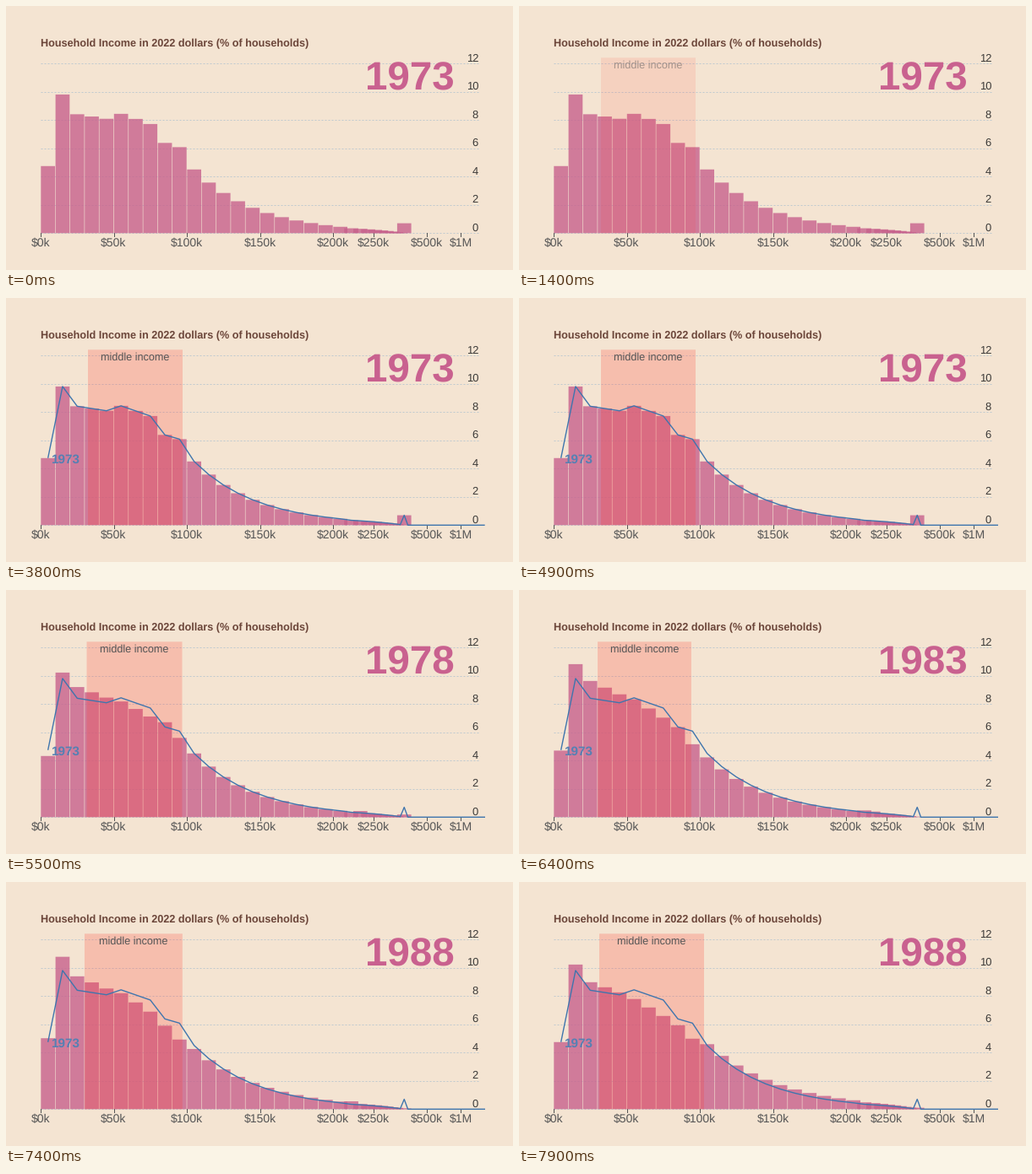
A matplotlib script that plays this animation: 600x313 px, repeating every 8 s.

```python
import numpy as np
import matplotlib.pyplot as plt
from matplotlib.animation import FuncAnimation
from matplotlib.patches import Rectangle

W, H, DPI = 600, 313, 100
FRAMES, STEP = 80, 100
BG = "#f4e4d2"
PINK = "#c7618c"
BLUE = "#3f75ad"
GREY = "#555555"
X0, BIN, Y0, UNIT = 41, 17.3, 269.3, 16.74
BINS, SQUEEZE = 32, 20      # bins from index 20 ($200k) on are squeezed

FADE = (900, 1000)          # start, duration in ms
TRACE = (1900, 2000)
LABEL = (2900, 1000)
YEARS_AT, YEARS_DUR = 4905, 1000

plt.rcParams["font.family"] = "Liberation Sans"
plt.rcParams["text.hinting"] = "none"


def ease(t):
    t = min(max(t, 0), 1)
    return 4 * t**3 if t < .5 else 1 - 4 * (1 - t)**3


def progress(ms, start, dur):
    return ease((ms - start) / dur)


def bin_x(i):
    squeezed = 65 * np.log(1 + .22 * np.maximum(i - SQUEEZE, 0))
    return X0 + BIN * np.minimum(i, SQUEEZE) + squeezed


KEY_BINS = [0, 1, 2, 4, 5, 7, 8, 9, 10]


def shares(keys, at_200k, top_bin, top):
    """Key points up to $100k, exponential decay to $200k, then linear to 0.
    The open-ended top bracket stands out of the tail."""
    i = np.arange(BINS)
    head = np.interp(i, KEY_BINS, keys)
    decay = keys[-1] * (at_200k / keys[-1]) ** ((i - 10) / 10)
    tail = .85 * at_200k * np.clip(1 - (i - SQUEEZE) / 10, 0, 1)
    out = np.where(i <= 10, head, np.where(i <= SQUEEZE, decay, tail))
    out[top_bin] = top
    return out


SHARES = [
    shares([4.75, 9.82, 8.42, 8.1, 8.45, 7.73, 6.39, 6.09, 4.51], .45, 30, .7),
    shares([4.18, 10.39, 9.5, 8.6, 8.1, 6.91, 6.84, 5.44, 4.51], .45, 22, .48),
    shares([5.28, 11.31, 9.8, 8.8, 8.6, 7.19, 5.88, 4.87, 3.94], .45, 21, .62),
    shares([4.75, 10.24, 8.99, 8.27, 7.8, 6.6, 5.94, 4.99, 4.6], .63, 30, .1),
]
BANDS = np.array([[97, 209], [95, 208.3], [91, 199.2], [95, 219]])

fig = plt.figure(figsize=(W / DPI, H / DPI), dpi=DPI, facecolor=BG)
ax = fig.add_axes([0, 0, 1, 1])
ax.set_xlim(0, W)
ax.set_ylim(H, 0)
ax.axis("off")


def text(x, y, s, px, color, **kw):
    return ax.text(x, y, s, fontsize=px * 72 / DPI, color=color,
                   va="baseline", **kw)


def box(x, y, w, h, **kw):
    return ax.add_patch(Rectangle((x, y), w, h, lw=0, snap=False, **kw))


text(41, 48.5, "Household Income in 2022 dollars (% of households)", 12.6,
     "#6b4539", weight="bold")

for v in range(0, 13, 2):
    y = Y0 - v * UNIT
    ax.plot([X0, 559], [y, y], color="#bfcad0", lw=.72,
            dashes=(2, 2), zorder=1)
    text(559, y - 2.6, str(v), 13, "#3c3a38", ha="right", zorder=6)

TICKS = {"$0k": 41, "$50k": 127.5, "$100k": 214, "$150k": 300.5,
         "$200k": 387, "$250k": 434.5, "$500k": 498, "$1M": 538}
for label, x in TICKS.items():
    ax.plot([x, x], [Y0, Y0 + 4], color=GREY, lw=.72, zorder=1)
    text(x, 285.3, label, 14, GREY, ha="center")

lefts = bin_x(np.arange(BINS))
bars = [box(x + .3, Y0, BIN - .6, 0, fc=PINK, alpha=.8, zorder=2)
        for x in lefts]

band = box(0, 61.3, 1, Y0 - 61.3, fc="#ff372d", zorder=3)
band_label = text(0, 74, "middle income", 12.6, GREY, ha="center", zorder=4)
year = text(425, 99.5, "", 47.5, "#c9618f", weight="bold", zorder=4)
base_label = text(53.5, 196, "1973", 15.2, "#5680b3", weight="bold", zorder=4)

path_x = np.append(lefts + BIN / 2, 567)
path_y = Y0 - UNIT * np.append(SHARES[0], 0)
path_len = np.append(0, np.cumsum(np.hypot(np.diff(path_x), np.diff(path_y))))
trace, = ax.plot([], [], color=BLUE, lw=1, zorder=5,
                 solid_capstyle="butt", solid_joinstyle="round")


def draw(frame):
    ms = frame * STEP

    since = (ms - YEARS_AT) / YEARS_DUR
    a = min(max(int(np.floor(since)), 0), len(SHARES) - 2)
    k = ease(since - a)
    for bar, share in zip(bars, SHARES[a] + k * (SHARES[a + 1] - SHARES[a])):
        bar.set_y(Y0 - share * UNIT)
        bar.set_height(share * UNIT)
    year.set_text(str(1973 + 5 * (a + 1 if since >= 0 else 0)))

    left, right = BANDS[a] + k * (BANDS[a + 1] - BANDS[a])
    band.set_x(left)
    band.set_width(right - left)
    band_label.set_x((left + right) / 2)
    shown = progress(ms, *FADE)
    band.set_alpha(.22 * shown)
    band_label.set_alpha(shown)

    drawn = progress(ms, *TRACE)
    end = drawn * path_len[-1]
    keep = path_len < end
    trace.set_data(np.append(path_x[keep], np.interp(end, path_len, path_x)),
                   np.append(path_y[keep], np.interp(end, path_len, path_y)))
    trace.set_visible(drawn > 0)
    base_label.set_alpha(progress(ms, *LABEL))
    return [*bars, band, band_label, year, trace, base_label]


anim = FuncAnimation(fig, draw, frames=FRAMES, interval=STEP,
                     init_func=lambda: draw(0), repeat=True, repeat_delay=0)
plt.show()
```
